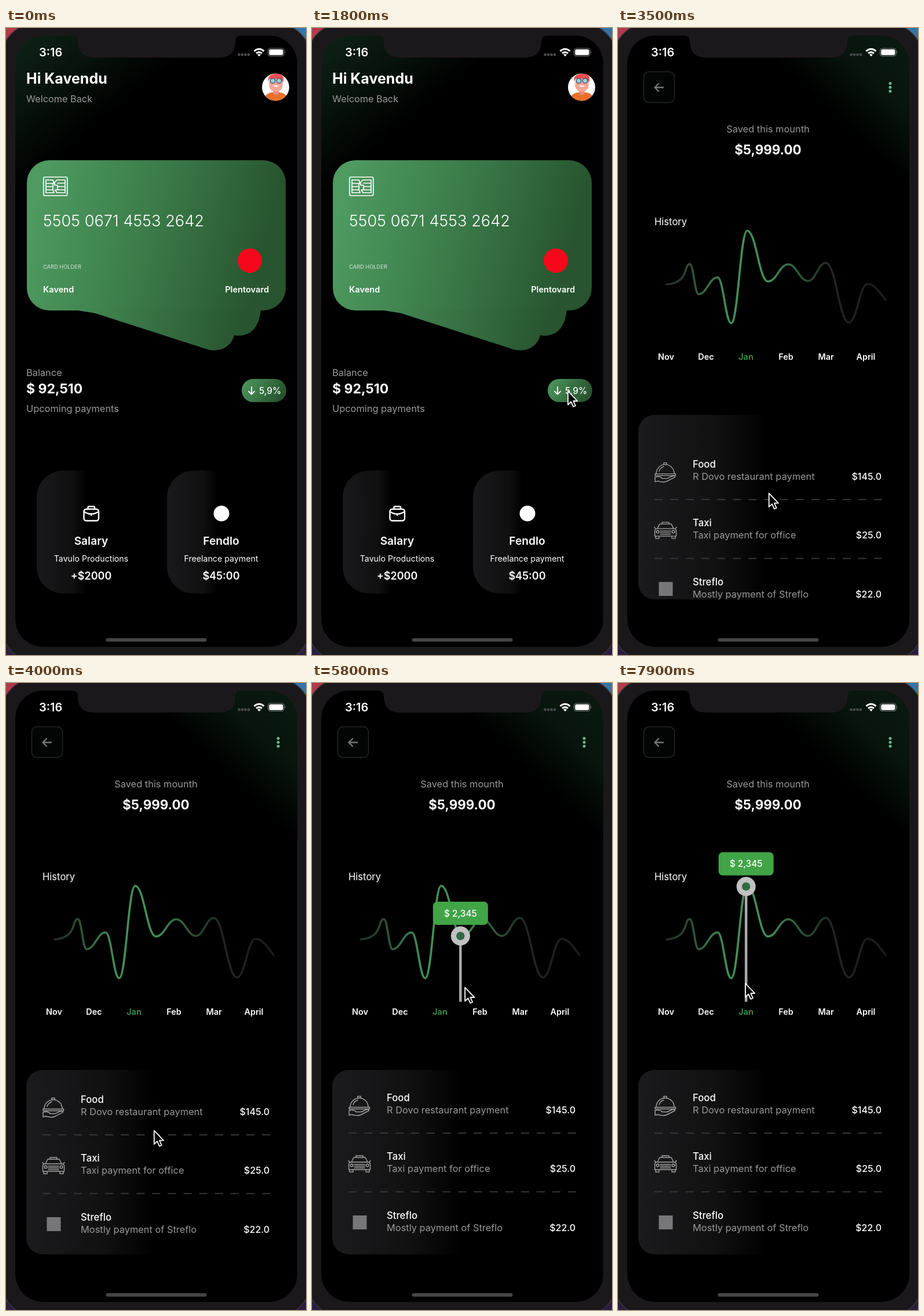
An HTML page for the animation above (8000 ms loop, 518x1081 px).

```html
<!DOCTYPE html>
<html lang="en">
<head>
<meta charset="utf-8">
<title>Wallet app</title>
<style>
html, body { margin: 0; width: 100%; height: 100%; overflow: hidden; background: #1b181b; }
svg { display: block; width: 518px; height: 1081px; }
text { font-family: Inter, "Open Sans", sans-serif; fill: #fff; white-space: pre; }
.grey { fill: #999; font-weight: 400; }
.line { fill: none; stroke: #fff; stroke-width: 2.4; stroke-linecap: round; stroke-linejoin: round; }
.thin { fill: none; stroke: #a5a5a5; stroke-width: 1.4; stroke-linecap: round; stroke-linejoin: round; }
</style>
</head>
<body>
<svg viewBox="0 0 518 1081">
  <defs>
    <clipPath id="screen"><rect x="16" y="13" width="487" height="1054" rx="48"/></clipPath>
    <clipPath id="listBox"><rect x="35" y="667" width="448" height="318" rx="28"/></clipPath>
    <clipPath id="face"><circle cx="465.500" cy="102" r="23.500"/></clipPath>
    <linearGradient id="glowL" gradientUnits="userSpaceOnUse" x1="16" y1="13" x2="150" y2="175">
      <stop stop-color="#0f2318"/><stop offset=".5" stop-color="#07130c"/><stop offset="1" stop-color="#000"/>
    </linearGradient>
    <linearGradient id="glowR" gradientUnits="userSpaceOnUse" x1="503" y1="20" x2="376" y2="154">
      <stop stop-color="#0a1a11"/><stop offset=".5" stop-color="#07150d"/><stop offset="1" stop-color="#000"/>
    </linearGradient>
    <linearGradient id="green" gradientUnits="userSpaceOnUse" x1="50" y1="310" x2="440" y2="405">
      <stop stop-color="#4e9a60"/><stop offset=".5" stop-color="#3b7b49"/><stop offset="1" stop-color="#28552f"/>
    </linearGradient>
    <linearGradient id="under" gradientUnits="userSpaceOnUse" x1="130" y1="480" x2="400" y2="540">
      <stop stop-color="#438852"/><stop offset="1" stop-color="#28552f"/>
    </linearGradient>
    <linearGradient id="pill" x2="1" y2=".3">
      <stop stop-color="#4e9a60"/><stop offset="1" stop-color="#28552f"/>
    </linearGradient>
    <linearGradient id="fade">
      <stop stop-color="#19191b"/><stop offset=".7" stop-color="#101011"/><stop offset="1" stop-color="#000"/>
    </linearGradient>
    <linearGradient id="fadeList" gradientUnits="userSpaceOnUse" x1="35" y1="0" x2="258" y2="0">
      <stop stop-color="#1b1b1d"/><stop offset=".6" stop-color="#111112"/><stop offset="1" stop-color="#000"/>
    </linearGradient>
    <linearGradient id="wave" gradientUnits="userSpaceOnUse" x1="84" y1="0" x2="462" y2="0">
      <stop stop-color="#222b25"/><stop offset=".1" stop-color="#2b4b35"/><stop offset=".28" stop-color="#438e59"/>
      <stop offset=".46" stop-color="#438e59"/><stop offset=".64" stop-color="#294b33"/>
      <stop offset=".76" stop-color="#1f2621"/><stop offset="1" stop-color="#1a1b1a"/>
    </linearGradient>
  </defs>

  <rect width="260" height="540" fill="#b23a4a"/>
  <rect x="259" width="259" height="540" fill="#3674a5"/>
  <rect y="540" width="518" height="541" fill="#2a1d40"/>
  <rect x="-8" y="-8" width="534" height="1100" rx="60" fill="#1b181b" stroke="#39353a" stroke-width="1.500"/>

  <g clip-path="url(#screen)">
    <g id="home">
      <rect x="16" y="13" width="487" height="1054" fill="url(#glowL)"/>
      <g clip-path="url(#face)">
        <rect x="441" y="78" width="49" height="49" fill="#fff"/>
        <path d="M444 128Q446 112 460 111H472Q486 112 488 128Z" fill="#e8702a"/>
        <path d="M461 105H471V113Q466 118 461 113Z" fill="#e98a7c"/>
        <rect x="454.500" y="84" width="23" height="26" rx="11" fill="#f6a595"/>
        <path d="M453 93Q451 82 460 80Q470 76 477 82Q481 86 478 94Q476 87 470 87Q460 88 456 87Q454 89 453 93Z" fill="#ee4d50"/>
        <g fill="#8fd3e2" stroke="#33506b" stroke-width="1.300">
          <circle cx="460.500" cy="91" r="4.200"/><circle cx="471.500" cy="91" r="4.200"/>
        </g>
        <path d="M461 99Q466 104.500 471 99Z" fill="#fff"/>
      </g>
      <path d="M139 487L343 552.500C366 561 388 552 394 530V487Z" fill="url(#under)"/>
      <path d="M118 486L400 530.500Q435 531 440 486Z" fill="url(#under)"/>
      <rect x="36" y="228" width="447" height="259" rx="39" fill="url(#green)"/>
      <g class="line" style="stroke-width:1.700">
        <rect x="64.800" y="257" width="41" height="32" rx="2.500"/>
        <path d="M69 262H81L83 268H69ZM69 268V279H81V268M69 273.500H81M69 279V284H83L81 279M102 262H88L84 266V271H89V279H85L88 284H102V279H89M102 262V279M89 267.500H102M89 273.500H102"/>
      </g>
      <circle cx="421" cy="401" r="21" fill="#f8071a"/>
      <rect x="407" y="605" width="77" height="40" rx="20" fill="url(#pill)"/>
      <path class="line" style="stroke-width:1.800" d="M424 619V631M419 626.500L424 631.500L429 626.500"/>
      <path d="M140 763H99A46 46 0 0 0 53 809V929A46 46 0 0 0 99 975H140Z" fill="url(#fade)"/>
      <path d="M365 763H324A46 46 0 0 0 278 809V929A46 46 0 0 0 324 975H365Z" fill="url(#fade)"/>
      <g class="line">
        <rect x="134.500" y="829.500" width="25.500" height="20" rx="4"/>
        <path d="M141.500 829V826.500Q141.500 825 143 825H151.500Q153 825 153 826.500V829M135 834Q147 842 159.500 834M147.200 837.500V840"/>
      </g>
      <circle cx="372" cy="837" r="13.500" fill="#fff"/>
    </g>

    <g id="detail">
      <rect x="16" y="13" width="487" height="1054" fill="url(#glowR)"/>
      <rect x="44.500" y="75.500" width="53" height="53" rx="9" fill="#030504" stroke="#25272a" stroke-width="1.400"/>
      <path class="line" style="stroke:#77777a" d="M78 102.500H64M70 96L63.500 102.500L70 109"/>
      <g fill="#72b58a"><circle cx="470" cy="95.500" r="2.500"/><circle cx="470" cy="102.300" r="2.500"/><circle cx="470" cy="109" r="2.500"/></g>
      <path id="curve" fill="none" stroke="url(#wave)" stroke-width="3.600" stroke-linecap="round"/>
      <g id="marker">
        <path id="stem" stroke="#aaa" stroke-width="4.500"/>
        <g id="knob">
          <circle r="16.500" fill="#c1c1c1"/><circle r="7.200" fill="#2f6b42"/>
          <rect x="-47.500" y="-59" width="95" height="40" rx="7" fill="#41a447"/>
        </g>
      </g>
      <path d="M258 667H63A28 28 0 0 0 35 695V957A28 28 0 0 0 63 985H258Z" fill="url(#fadeList)"/>
      <g clip-path="url(#listBox)"><g id="list">
        <g class="thin">
          <path d="M66 731A15.500 15.500 0 0 1 97 731M64 731.500H99.500V734.500H64ZM79 715V712.500H84V715M71 727Q73 721 79 719M64 737V745L69 744Q77 747 84 744.500L98 737.500Q99 735 95 735L85 739.500H76M76 739Q72 735 64 737"/>
          <path d="M68 826L72 818H92L96 826M76 818V815H88V818M63.500 830Q63.500 826 68 826H96Q100.500 826 100.500 830V839H63.500ZM65 839V843H71V839M93 839V843H99V839M73 830H91M73 833H91M73 836H91M65 826L63 823.500M99 826L101 823.500"/>
          <circle cx="68.500" cy="831.500" r="2.300"/><circle cx="95.500" cy="831.500" r="2.300"/>
        </g>
        <rect x="70.500" y="918" width="24" height="24" fill="#777779"/>
        <path d="M63 776H456M63 877.300H456" stroke="#363638" stroke-width="2" stroke-dasharray="14 13.070"/>
      </g></g>
    </g>
  </g>

  <path d="M114 12V13Q124 13 124 23Q124 51 152 51H368Q396 51 396 23Q396 13 406 13V12Z" fill="#1b181b"/>
  <g id="status">
    <g fill="#48494a"><circle cx="402.500" cy="46" r="2.400"/><circle cx="408" cy="46" r="2.400"/><circle cx="413.500" cy="46" r="2.400"/><circle cx="419" cy="46" r="2.400"/></g>
    <g fill="none" stroke="#fff" stroke-width="3"><path d="M428.500 40Q437 32.500 445.500 40M432 43.700Q437 39.500 442 43.700"/></g>
    <path d="M434 45.800Q437 43.500 440 45.800L437 49Z" fill="#fff"/>
    <rect x="452.500" y="35" width="27.500" height="13.500" rx="4" fill="none" stroke="#777" stroke-width="1.200"/>
    <rect x="454.300" y="36.800" width="24" height="10" rx="2.500" fill="#fff"/>
    <path d="M481.500 39.500Q483.500 41.700 481.500 44Z" fill="#777"/>
  </g>
  <rect x="172.500" y="1052" width="174" height="6" rx="3" fill="#454546"/>
  <path id="cursor" d="M1 1V24.500L6.300 19.500L10.200 28L14 26.300L10.200 18H17.200Z" fill="#000" stroke="#fff" stroke-width="1.800" stroke-linejoin="round"/>
</svg>

<script>
const $ = id => document.getElementById(id);
const NS = 'http://www.w3.org/2000/svg';
const LOOP = 8000;

function label(parent, str, x, y, size, weight = 400, anchor = 'start', fill) {
  const el = document.createElementNS(NS, 'text');
  const attrs = { x, y, 'font-size': size, 'text-anchor': anchor };
  for (const k in attrs) el.setAttribute(k, attrs[k]);
  if (weight === 'grey') el.setAttribute('class', 'grey');
  else el.style.fontWeight = weight;
  if (fill) el.style.fill = fill;
  el.textContent = str;
  $(parent).appendChild(el);
}

label('status', '3:16', 57, 49, 20, 600);

label('home', 'Hi Kavendu', 35, 96, 25, 700);
label('home', 'Welcome Back', 35, 127.5, 16.3, 'grey');
label('home', '5505 0671 4553 2642', 64, 341.5, 27.2, 300);
label('home', 'CARD HOLDER', 64, 415, 9.3, 400, 'start', '#d5e3d8');
label('home', 'Kavend', 64, 455.5, 14.6, 600);
label('home', 'Plentovard', 454, 455.5, 14.6, 600, 'end');
label('home', 'Balance', 35, 600, 16.4, 'grey');
label('home', '$ 92,510', 35, 630, 23, 700);
label('home', 'Upcoming payments', 35, 662, 16.4, 'grey');
label('home', '5,9%', 437, 630.5, 15.3, 500);
[[147, 'Salary', 'Tavulo Productions', '+$2000'],
 [371.5, 'Fendlo', 'Freelance payment', '$45:00']].forEach(([x, name, note, sum]) => {
  label('home', name, x, 891, 19.2, 600, 'middle');
  label('home', note, x, 919.5, 14.2, 400, 'middle');
  label('home', sum, x, 951, 18, 600, 'middle');
});

label('detail', 'Saved this mounth', 259, 180, 16.4, 'grey', 'middle');
label('detail', '$5,999.00', 259, 217.5, 22.4, 700, 'middle');
label('detail', 'History', 63, 339.5, 16.6);
['Nov', 'Dec', 'Jan', 'Feb', 'Mar', 'April'].forEach((m, i) =>
  label('detail', m, 83 + 69 * i, 572, 14.4, 600, 'middle', m === 'Jan' ? '#41954c' : ''));
[['Food', 'R Dovo restaurant payment', '$145.0'],
 ['Taxi', 'Taxi payment for office', '$25.0'],
 ['Streflo', 'Mostly payment of Streflo', '$22.0']].forEach(([name, note, sum], i) => {
  const y = 721 + 101.3 * i;
  label('list', name, 129, y, 16.7, 500);
  label('list', note, 129, y + 21, 16.4, 'grey');
  label('list', sum, 455, y + 21, 16, 500, 'end');
});
label('knob', '$ 2,345', 0, -33.5, 15.4, 500, 'middle');
$('detail').appendChild($('marker'));

// Chart: flat tangents at every peak and trough
const turns = [[124, 407], [139, 459], [172, 430], [195.5, 509], [223, 349.5], [259, 437],
               [294, 407.5], [328, 436], [359, 405], [399, 507.5], [431, 441]];
let d = 'M84 442C124 439 113 407 124 407';
turns.slice(1).forEach(([x, y], i) => {
  const [px, py] = turns[i], k = (x - px) * 0.43;
  d += `C${px + k} ${py} ${x - k} ${y} ${x} ${y}`;
});
const curve = $('curve');
curve.setAttribute('d', d + 'C443 441 452 456 462 469');
const curveLen = curve.getTotalLength();

function curveY(x) {
  let lo = 0, hi = curveLen;
  for (let i = 0; i < 18; i++) {
    const mid = (lo + hi) / 2;
    if (curve.getPointAtLength(mid).x < x) lo = mid; else hi = mid;
  }
  return curve.getPointAtLength(lo).y;
}

// Pointer: time, x, y
const track = [[1000, 530, 790], [1550, 441, 625], [2050, 441, 625], [2700, 398, 682],
  [3200, 270, 735], [3550, 258, 812], [3650, 258, 812], [4000, 255, 771], [4750, 105, 532],
  [4950, 118, 530], [5800, 263, 524], [6300, 345, 521], [6600, 345, 520], [7100, 305, 517],
  [7250, 300, 517], [7700, 230, 517], [7900, 219, 517], [8000, 217, 517]];

function pointer(t) {
  const i = track.findIndex(k => k[0] > t);
  if (i < 1) return track[0].slice(1);
  const [t0, x0, y0] = track[i - 1], [t1, x1, y1] = track[i];
  const p = (t - t0) / (t1 - t0);
  return [x0 + (x1 - x0) * p, y0 + (y1 - y0) * p];
}

const clamp = v => Math.min(1, Math.max(0, v));
const place = (id, x, y) => $(id).setAttribute('transform', `translate(${x} ${y})`);

// List pulled down, then springing back
function pull(t) {
  if (t < 3200) return 0;
  if (t < 3650) return 38 * Math.sin(clamp((t - 3200) / 350) * Math.PI / 2);
  return t < 4400 ? 38 * Math.exp((3650 - t) / 138) : 0;
}

function draw(t) {
  const push = 1 - Math.pow(1 - clamp((t - 1980) / 520), 3);
  place('home', -146 * push, 0);
  $('home').style.display = push < 1 ? '' : 'none';
  $('detail').style.display = push > 0 ? '' : 'none';
  place('detail', 487 * (1 - push), 0);
  place('list', 0, pull(t));

  const held = (t >= 4950 && t < 6550) || t >= 7300;
  $('marker').style.display = held ? '' : 'none';
  if (held) {
    const x = pointer(t - 40)[0], y = curveY(x);
    place('knob', x, y);
    $('stem').setAttribute('d', `M${x} ${y}V549.500`);
  }
  $('cursor').style.display = t > 1000 ? '' : 'none';
  place('cursor', ...pointer(t));
}

function tick() {
  draw(performance.now() % LOOP);
  requestAnimationFrame(tick);
}
tick();
</script>
</body>
</html>
```
